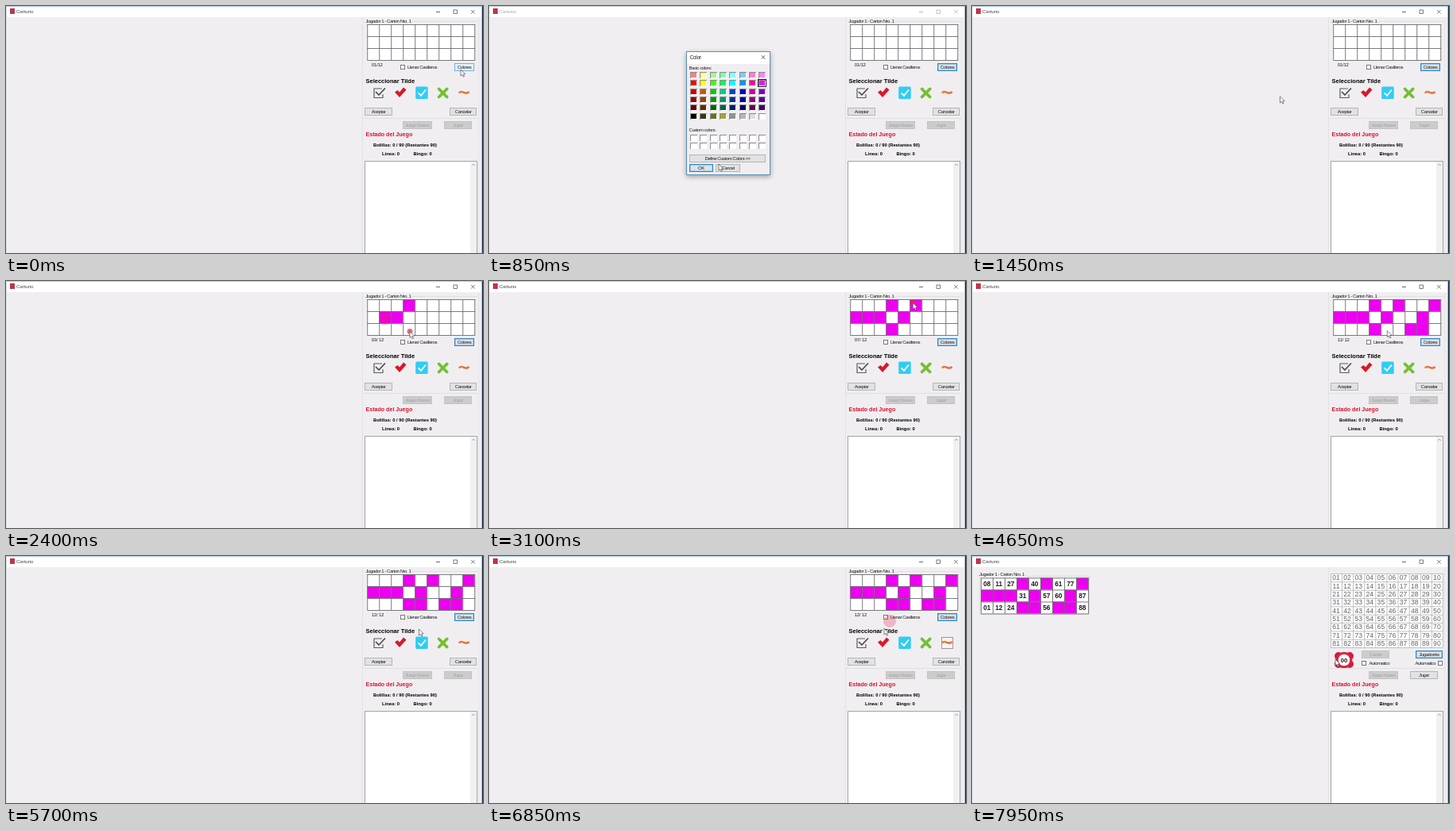
Recreate the animation shown at these times as an HTML page with a canvas. Size 600 by 311 pixels, loop 8000 ms.

```html
<!DOCTYPE html>
<html lang="es">
<head>
<meta charset="utf-8">
<title>Cartuno</title>
<style>
html, body { margin: 0; width: 100%; height: 100%; overflow: hidden; background: #f0eef1; }
canvas { display: block; }
</style>
</head>
<body>
<canvas id="stage" width="600" height="311"></canvas>
<script>
const ctx = document.getElementById('stage').getContext('2d');
const LOOP = 8000;
const BG = '#f0eef1', INK = '#1c1c1c', PINK = '#ee00f0', BLUE = '#2b86cf', RED = '#d8102c';
const SANS = '"Liberation Sans", Arial, sans-serif';
const CELL = 15, GRID_X = 454.3, GRID_Y = 23;

const T = { open: 200, pick: 590, close: 1150, mark: 6400, swap: 7600, fill: 7700 };

const CARD = ['08 11 27 . 40 . 61 77 .', '. . . 31 . 57 60 . 87', '01 12 24 . . 56 . . 88']
  .map(row => row.split(' '));
// order in which blanks are painted: column letter, row number
const ORDER = 'd1 c2 b2 d3 a2 e2 f1 g3 i1 h2 h3 e3'.split(' ');

// clicks slow down towards the end; the aim wobbles inside the cell
const clickTime = i => 1820 + 183.7 * i + .7 * i ** 3;
const CELLS = ORDER.map((name, i) => {
  const col = name.charCodeAt(0) - 97, row = name[1] - 1, wobble = Math.cos((i - 3) * .7);
  return {
    col, row, click: true, t: clickTime(i),
    rest: .35 * (clickTime(i) - clickTime(i - 1)),
    x: GRID_X + (col + .5) * CELL - 2 + 3.2 * wobble,
    y: GRID_Y + (row + .5) * CELL - 1 + 4 * wobble
  };
});

const stop = (t, x, y, click = true) => ({ t, x, y, click, rest: click ? 60 : 0 });
const STOPS = [
  stop(120, 572, 80), stop(T.pick, 343, 99), stop(850, 289, 199, false), stop(T.close - 40, 268, 203),
  ...CELLS,
  stop(5950, 519, 96, false), stop(T.mark - 20, 576, 110), stop(6660, 504, 82),
  stop(6850, 497, 91, false), stop(7230, 457, 130)
];

function box(x, y, w, h, fill, line) {
  if (fill) { ctx.fillStyle = fill; ctx.fillRect(x, y, w, h); }
  if (line) {
    ctx.strokeStyle = line; ctx.lineWidth = 1;
    ctx.strokeRect(x + .5, y + .5, w - 1, h - 1);
  }
}

function poly(pts, color, width, close) {
  ctx.beginPath();
  pts.forEach(([x, y], i) => i ? ctx.lineTo(x, y) : ctx.moveTo(x, y));
  if (close) ctx.closePath();
  if (width) { ctx.strokeStyle = color; ctx.lineWidth = width; ctx.stroke(); }
  else { ctx.fillStyle = color; ctx.fill(); }
}

function cross(x, y, r, color, width) {
  poly([[x - r, y - r], [x + r, y + r]], color, width);
  poly([[x + r, y - r], [x - r, y + r]], color, width);
}

function disc(x, y, r, color) {
  ctx.beginPath(); ctx.arc(x, y, r, 0, 7); ctx.fillStyle = color; ctx.fill();
}

function put(s, x, y, { size = 6, bold = false, color = INK, align = 'left', gap = -.45 } = {}) {
  ctx.font = (bold ? 'bold ' : '') + size + 'px ' + SANS;
  ctx.letterSpacing = gap + 'px';
  ctx.textAlign = align;
  ctx.fillStyle = color;
  ctx.fillText(s, x, y);
}

const strong = (s, x, y, size, color = INK) => put(s, x, y, { size, bold: true, color, gap: 0 });
const two = n => String(n).padStart(2, '0');

function button(s, x, y, w, state) {
  const off = state === 'off', hot = state === 'hover';
  box(x, y, w, 10, off ? '#cdcccd' : hot ? '#e5f1fb' : '#e2e1e3',
    off ? '#c4c3c4' : hot ? '#6fb0e2' : state === 'focus' ? BLUE : '#b5b4b6');
  if (state === 'focus') box(x + 1, y + 1, w - 2, 8, null, '#a5cbe8');
  put(s, x + w / 2, y + 7.1, { align: 'center', color: off ? '#a3a2a4' : INK });
}

const check = (x, y) => box(x, y, 6, 6, '#fff', '#77767a');

function frameWindow(away) {
  const ink = away ? '#aaa' : '#444';
  box(0, 0, 600, 311, BG);
  box(0, 0, 599, 14, '#fff');
  box(0, 0, 599, 1, away ? '#ccc' : '#a9cde6');
  box(0, 0, 1, 311, '#d5dfe8');
  box(598, 0, 1, 311, '#a9bccd');
  box(599, 0, 1, 311, '#16233d');
  box(5, 3, 6, 7, '#c2334c');
  put('Cartuno', 13, 9.4, { size: 6.2, color: ink, gap: -.1 });
  box(541, 7, 5, .8, ink);
  ctx.strokeStyle = ink; ctx.lineWidth = .7;
  ctx.strokeRect(563, 5, 4.5, 4.5);
  cross(587.3, 7.3, 2.3, ink, .7);
  box(448, 14, 1, 297, '#e2e1e4');
  box(594, 14, 1, 297, '#e6e5e8');
}

function status(playing) {
  box(449, 141, 145, 1, '#e0dfe2');
  button('Juego Nuevo', 499, 145, 37, 'off');
  button('Jugar', 551, 145, 35, playing ? '' : 'off');
  strong('Estado del Juego', 452.5, 163.7, 7.1, RED);
  strong('Bolillas: 0 / 90 (Restantes 90)', 462, 177, 5.8, '#000');
  strong('Linea: 0', 473, 188, 5.8, '#000');
  strong('Bingo: 0', 512.5, 188, 5.8, '#000');
  box(451, 195, 142, 120, '#fff', '#a5a4a9');
  box(584, 196, 8, 115, '#f1f0f2');
  poly([[586, 201], [588, 199], [590, 201]], '#aaa', 1);
}

function grid(x, y, painted) {
  box(x, y, 9 * CELL, 3 * CELL, '#fff');
  for (const { col, row } of painted) box(x + col * CELL, y + row * CELL, CELL, CELL, PINK);
  const ink = '#6d6b70';
  for (let c = 0; c <= 9; c++) box(x + c * CELL, y, .9, 3 * CELL, ink);
  for (let r = 0; r <= 3; r++) box(x, y + r * CELL, 9 * CELL + .9, .9, ink);
}

function marks(t) {
  // outlined box with tick
  ctx.lineJoin = ctx.lineCap = 'round';
  poly([[472.5, 104], [463, 104], [463, 115.5], [474, 115.5], [474, 111.5]], '#5a5b5d', 1.2);
  poly([[465.5, 108.5], [469, 112], [476.5, 104]], '#48494b', 1.7);
  ctx.lineCap = 'butt';
  ctx.lineJoin = 'miter';
  // red tick
  poly([[489, 108.5], [492.5, 106], [495, 108.5], [500, 102.5], [503.5, 105.5], [495, 115]], '#d9182a', 0, true);
  // white tick on cyan
  ctx.beginPath(); ctx.roundRect(515.2, 101.5, 15.5, 15.5, 1.5);
  ctx.fillStyle = '#2fcdf2'; ctx.fill();
  poly([[518.5, 109.3], [522, 112.8], [528, 105.5]], '#fff', 1.8);
  // green cross
  ctx.lineCap = 'round';
  cross(549.6, 109.5, 5, '#74bf32', 3.8);
  ctx.lineCap = 'butt';
  // wavy line
  if (t >= T.mark) box(569, 102, 15, 15, '#f5f3f3', '#9a989c');
  ctx.beginPath();
  ctx.moveTo(570, 109.8);
  ctx.bezierCurveTo(573, 104, 577, 113.5, 582.5, 108);
  ctx.strokeStyle = '#e9743f'; ctx.lineWidth = 2.5; ctx.stroke();
}

function setup(t) {
  const painted = CELLS.filter(c => t >= c.t + 20);
  const n = painted.length;
  box(450, 19, 144, 1, '#e0dfe2');
  box(451, 15, 60, 7, BG);
  put('Jugador 1 - Carton Nro. 1', 452.5, 21.2);
  grid(GRID_X, GRID_Y, painted);
  put(n ? two(n) + '/ 12' : '01/12', 459.7, 76, { gap: -.2 });
  check(496, 74);
  put('Llenar Casilleros', 505, 79.2);
  button('Colores', 564, 72, 25, t < T.open ? 'hover' : 'focus');
  strong('Seleccionar Tilde', 452.5, 97, 7.5, '#000');
  marks(t);
  button('Aceptar', 451, 128, 35);
  button('Cancelar', 558, 128, 34);
}

function board(full) {
  const w = 14.1, h = 10.35;
  box(451, 22, 10 * w, 9 * h, '#fff');
  for (let c = 0; c <= 10; c++) box(451 + c * w, 22, .9, 9 * h, '#b9b8bb');
  for (let r = 0; r <= 9; r++) box(451, 22 + r * h, 10 * w, .9, '#b9b8bb');
  for (let i = 0; full && i < 90; i++) {
    put(two(i + 1), 458 + i % 10 * w, 30.3 + Math.floor(i / 10) * h,
      { size: 8.6, color: '#66656a', align: 'center', gap: 0 });
  }
}

function ball(x, y) {
  for (const dx of [-7, 7]) for (const dy of [-5, 5]) disc(x + dx, y + dy, 5, '#d0184a');
  disc(x, y, 10.3, '#dd2238');
  disc(x, y, 7.3, '#fff');
  put('00', x, y + 2.7, { size: 7.6, bold: true, align: 'center', gap: 0 });
}

function game(t) {
  const full = t >= T.fill;
  board(full);
  ball(468, 131);
  button('Cantar', 490, 119, 35, 'off');
  button('Jugador/es', 558, 119, 34, 'focus');
  check(490, 132);
  put('Automatico', 499.5, 137.3);
  put('Automatico', 557.5, 137.3);
  check(586, 132);

  box(9, 25, 139, 49, null, '#dddcdf');
  grid(11, 27.5, CELLS);
  if (!full) return;
  box(9, 18, 59, 8, BG);
  put('Jugador 1 - Carton Nro. 1', 9, 24.9);
  CARD.forEach((row, r) => row.forEach((s, c) => {
    if (s !== '.') put(s, 18.8 + c * CELL, 37.9 + r * CELL, { size: 8.3, bold: true, align: 'center', gap: 0 });
  }));
}

// hues run red to magenta; the rows grow darker and the last one is muted
function swatchColor(c, r) {
  const wheel = r < 2 ? [0, 60, 105, 140, 180, 205, 325, 300] : [0, 25, 120, 160, 220, 240, 315, 275];
  if (r === 5) return `hsl(60 ${c > 0 && c < 4 ? 50 : 0}% ${c * 100 / 7}%)`;
  return `hsl(${wheel[c]} 100% ${r ? 60 - r * 10 : 75}%)`;
}

function swatch(c, y, color, chosen) {
  const x = Math.round(253 + c * 12.3);
  box(x, y, 9, 8, color, '#fff');
  box(x, y, 9, 1, '#8d8c90');
  box(x, y, 1, 8, '#8d8c90');
  if (chosen) box(x - 1, y - 1, 11, 10, null, '#222');
}

function dialog(t) {
  ctx.save();
  ctx.shadowColor = 'rgba(0,0,0,.35)';
  ctx.shadowBlur = 6;
  ctx.shadowOffsetY = 2;
  box(248, 57, 106, 156, BG);
  ctx.restore();
  box(248, 57, 106, 16, '#fff');
  box(248, 57, 106, 156, null, '#5a90ba');
  put('Color', 252.5, 67, { size: 6.3, gap: -.1 });
  cross(345, 64.5, 2.2, '#333', .8);
  put('Basic colors:', 251.5, 80);
  const chosen = t < T.pick ? 40 : 15;
  for (let i = 0; i < 48; i++) {
    const c = i % 8, r = Math.floor(i / 8);
    swatch(c, Math.round(83 + r * 10.35), swatchColor(c, r), i === chosen);
  }
  put('Custom colors:', 251.5, 157.5);
  for (let i = 0; i < 16; i++) swatch(i % 8, i < 8 ? 162 : 172, '#fff');
  button('Define Custom Colors >>', 252, 187, 96);
  button('OK', 252, 199, 30, 'focus');
  button('Cancel', 285, 199, 31);
}

// eases from stop to stop, resting around each click
function pointerAt(t) {
  const i = STOPS.findIndex(s => s.t > t);
  if (i === 0) return STOPS[0];
  if (i < 0) return STOPS[STOPS.length - 1];
  const a = STOPS[i - 1], b = STOPS[i];
  const from = a.t + (a.click ? 30 : 0), to = b.t - b.rest;
  const u = Math.min(1, Math.max(0, (t - from) / (to - from)));
  const k = u * u * (3 - 2 * u);
  return { x: a.x + (b.x - a.x) * k, y: a.y + (b.y - a.y) * k };
}

function ripples(t) {
  for (const s of STOPS) {
    const u = (t - s.t) / 250;
    if (!s.click || u < 0 || u >= 1) continue;
    const k = Math.sqrt(u);
    disc(s.x, s.y, 2 + 6.8 * k, `rgba(226,40,85,${.85 - .65 * k})`);
  }
}

function arrow({ x, y }) {
  const shape = [[0, 0], [0, 8], [1.9, 6.4], [3.2, 9.2], [4.5, 8.6], [3.3, 5.9], [5.7, 5.7]]
    .map(([dx, dy]) => [x + dx, y + dy]);
  poly(shape, '#fff', 0, true);
  poly(shape, '#333', .6, true);
}

function draw(t) {
  const playing = t >= T.swap, picking = t >= T.open && t < T.close;
  frameWindow(picking);
  (playing ? game : setup)(t);
  status(playing);
  if (picking) dialog(t);
  ripples(t);
  arrow(pointerAt(t));
}

function tick(now) {
  draw(now % LOOP);
  requestAnimationFrame(tick);
}
draw(0);
requestAnimationFrame(tick);
</script>
</body>
</html>
```
